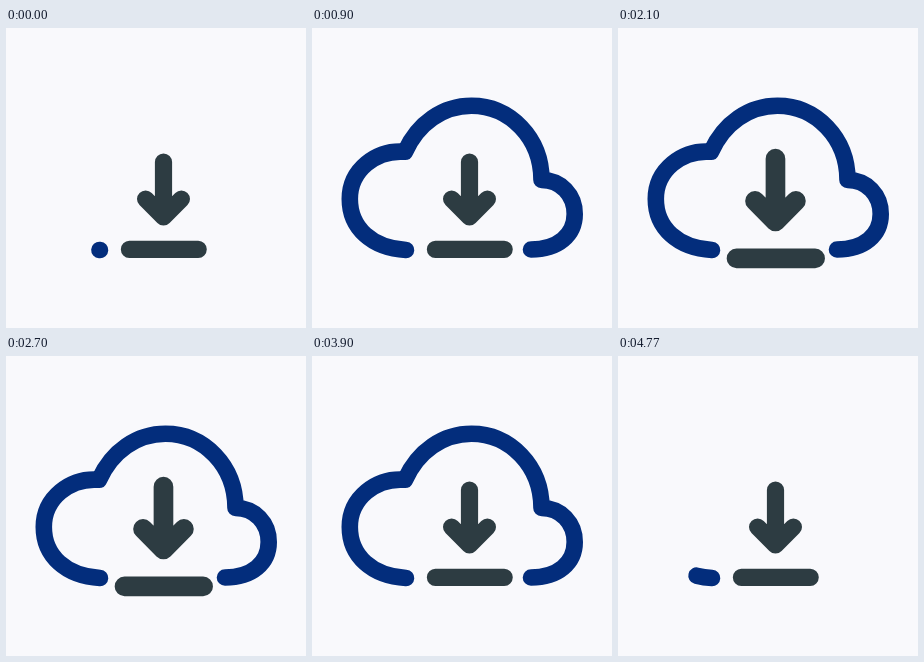
These frames come from a looping animation (300 by 300 pixels, 4800 ms). An HTML page with a canvas:

```html
<!DOCTYPE html>
<html lang="en">
<head>
<meta charset="utf-8">
<title>Cloud download</title>
<style>
  html, body { margin: 0; width: 100%; height: 100%; overflow: hidden; background: #f9f9fc; }
  canvas { display: block; width: 300px; height: 300px; }
</style>
</head>
<body>
<canvas id="stage"></canvas>
<script>
const SIZE = 300, LOOP = 4800;
const BACK = '#f9f9fc', BLUE = '#032d7c', DARK = '#2d3c42';
const DRAW_TIME = 900;
const GROW_START = 1530, GROW_TIME = 360, GROW = 0.143;
const PIVOT = { x: 157.7, y: 157.5 };

const CLOUD = 'M94 222 C60 220 37.8 200 37.8 171 C37.8 142 64 121.5 93 123.8 ' +
  'C106 95 131 77.7 159.5 77.7 C198 77.7 229.5 110 229.5 152 ' +
  'C249 152 262.7 167 262.7 186 C262.7 207 246 221.5 219 221.5';
const ARROW = 'M157.5 134 V186 M139.6 171 L157.5 189 L175.4 171 M123.4 221.3 H192.2';

const cloud = new Path2D(CLOUD);
const arrow = new Path2D(ARROW);
const cloudLength = measure(CLOUD);

const canvas = document.getElementById('stage');
const ctx = canvas.getContext('2d');
const ratio = window.devicePixelRatio || 1;
canvas.width = canvas.height = Math.round(SIZE * ratio);

function measure(d) {
  const path = document.createElementNS('http://www.w3.org/2000/svg', 'path');
  path.setAttribute('d', d);
  return path.getTotalLength();
}

const clamp = v => Math.min(1, Math.max(0, v));

function stroke(path, color, width) {
  ctx.strokeStyle = color;
  ctx.lineWidth = width;
  ctx.stroke(path);
}

function drawCloud(part) {
  if (part <= 0) return;
  ctx.setLineDash(part < 1 ? [cloudLength * part, cloudLength * 2] : []);
  stroke(cloud, BLUE, 16.6);
  ctx.setLineDash([]);
}

function drawArrow(scale) {
  ctx.save();
  ctx.translate(PIVOT.x, PIVOT.y);
  ctx.scale(scale, scale);
  ctx.translate(-PIVOT.x, -PIVOT.y);
  stroke(arrow, DARK, 17.2);
  ctx.restore();
}

function render(time) {
  // The second half of the loop plays the first half backwards.
  const t = Math.min(time, LOOP - time);
  ctx.setTransform(ratio, 0, 0, ratio, 0, 0);
  ctx.fillStyle = BACK;
  ctx.fillRect(0, 0, SIZE, SIZE);
  ctx.lineCap = ctx.lineJoin = 'round';
  drawCloud(clamp(t / DRAW_TIME));
  drawArrow(1 + GROW * clamp((t - GROW_START) / GROW_TIME));
}

const start = performance.now();
function tick() {
  render((performance.now() - start) % LOOP);
  requestAnimationFrame(tick);
}
tick();
</script>
</body>
</html>
```
